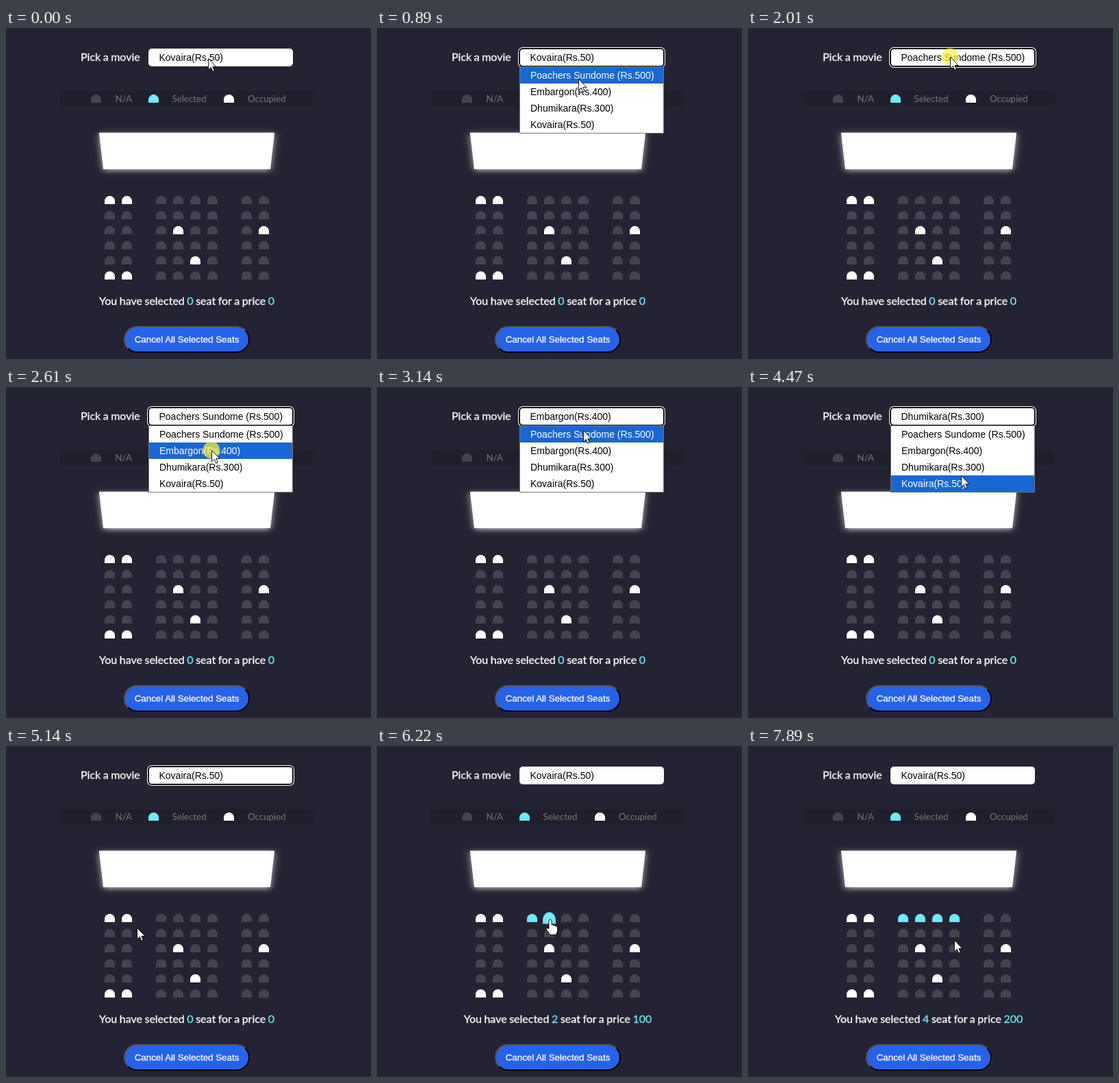
These frames come from a looping animation (533 by 483 pixels, 8 s). An HTML page:

```html
<!DOCTYPE html>
<html lang="en">
<head>
<meta charset="utf-8">
<title>Seat booking</title>
<style>
  html, body { margin: 0; width: 100%; height: 100%; overflow: hidden; background: #242333; }
  .stage { position: absolute; left: 139px; top: 130px; width: 250px; height: 252px; perspective: 1000px; }
  .screen { position: absolute; top: 15.3px; width: 250px; height: 70px; background: #fff;
    transform: rotateX(-45deg); box-shadow: 0 3px 10px rgba(255, 255, 255, .7); }
  .button { position: absolute; left: 172px; top: 435px; width: 184px; height: 39px; box-sizing: border-box;
    border: 2px outset #000; border-radius: 20px; background: #2563eb; }
  svg { position: absolute; left: 0; top: 0; }
  text { font: 16px Lato, sans-serif; word-spacing: -.55px; fill: #fff; white-space: pre; }
  .strong { stroke: #fff; stroke-width: .3px; }
  .ui { font: 14px "Liberation Sans", Arial, sans-serif; word-spacing: 0; fill: #000; }
  .label { font-size: 13.333px; fill: #777; }
  .free { fill: #444451; }
  .chosen { fill: #6feaf6; }
  tspan { fill: #6feaf6; stroke: #6feaf6; }
  .taken { fill: #fff; }
  .cursor { fill: #fff; stroke: #000; stroke-width: .9px; stroke-linejoin: round; }
</style>
</head>
<body>
<div class="stage"><div class="screen"></div></div>
<div class="button"></div>
<svg width="533" height="483">
  <text class="strong" x="109" y="48">Pick a movie</text>
  <rect x="79" y="92" width="370" height="22" rx="5" fill="#000" opacity=".1"/>
  <g id="seats"></g>
  <text class="label" x="159.5" y="108">N/A</text>
  <text class="label" x="242.5" y="108">Selected</text>
  <text class="label" x="353" y="108">Occupied</text>
  <text class="strong" x="264" y="404" text-anchor="middle">You have selected <tspan id="count">0</tspan> seat for a price <tspan id="price">0</tspan></text>
  <text class="ui strong" x="264" y="459" text-anchor="middle" style="font-size:13.333px;fill:#fff">Cancel All Selected Seats</text>
  <g id="ring">
    <rect x="206" y="28" width="215" height="30" rx="7" fill="#fff"/>
    <rect x="207" y="29" width="213" height="28" rx="6" fill="#101010"/>
  </g>
  <rect id="field" fill="#fff"/>
  <text class="ui" id="title" x="223.5" y="48"></text>
  <g id="list">
    <rect x="208.5" y="56.5" width="210" height="97" fill="#fff" stroke="#767676"/>
    <rect id="mark" x="209" width="209" height="24" fill="#1967d2"/>
  </g>
  <circle id="halo" r="12.5" fill="#fff23a" opacity=".7"/>
  <path id="arrow" class="cursor" d="M.5 .5V17L4.3 13.4L6.8 19.3L9.3 18.3L6.8 12.5H12Z"/>
  <path id="hand" class="cursor" d="M-2 1.5Q0-1 2 1.5V8Q4 7 5 9Q7 8 8 10Q10.5 9.5 10.5 12V17L8.5 22.5H0L-5.5 15Q-5.5 11.5-2 13.5Z"/>
</svg>
<script>
const LOOP = 8000, PRESS = 70, REACT = 60;
const $ = id => document.getElementById(id);
const movies = ['Poachers Sundome (Rs.500)', 'Embargon(Rs.400)', 'Dhumikara(Rs.300)', 'Kovaira(Rs.50)'];

// One entry per movie, in list order: the press that opens the list, the press that picks
const choices = [
  { open: 70, x: 295, y: 44, pick: 1450 },
  { open: 2010, x: 295, y: 42, pick: 2610 },
  { open: 3010, x: 300, y: 51, pick: 3540 },
  { open: 3940, x: 315, y: 39, pick: 4670 }];
const bookings = [0, 1, 2, 3].map(i => 5740 + 410 * i);
const presses = [...choices.flatMap(c => [c.open, c.pick]), ...bookings];

// The pointer settles before a press and leaves after it
const rest = (t, x, y) => [[t - 130, x, y], [t + PRESS, x, y]];
const path = [
  ...choices.flatMap((c, i) => [...rest(c.open, c.x, c.y), ...rest(c.pick, 295 + 5 * i, 67 + 25 * i)]),
  ...bookings.flatMap((t, i) => rest(t, 228 + 25 * i, 253)),
  ...rest(630, 294, 77), ...rest(1680, 295, 67),
  [5140, 191, 265], [5270, 198, 280], [7560, 301, 283], [LOOP, 301, 283]
].sort((a, b) => a[0] - b[0]);

function pointer(t) {
  const i = path.findIndex(p => p[0] > t);
  const [t0, x0, y0] = path[i - 1], [t1, x1, y1] = path[i];
  const k = (t - t0) / (t1 - t0);
  return [Math.round(x0 + (x1 - x0) * k), Math.round(y0 + (y1 - y0) * k)];
}

function set(node, attrs) {
  for (const key in attrs) node.setAttribute(key, attrs[key]);
}
function add(parent, tag, attrs) {
  const node = document.createElementNS('http://www.w3.org/2000/svg', tag);
  set(node, attrs);
  return parent.appendChild(node);
}
function addSeat(x, y, kind) {
  const d = `M${x} ${y + 12}v-4.5a7.5 7.5 0 0 1 15 0v4.5z`;
  return { x, y, kind, node: add($('seats'), 'path', { d, class: kind }) };
}

addSeat(124, 97, 'free');
addSeat(208, 97, 'chosen');
addSeat(318, 97, 'taken');
const plan = ['##......', '........', '...#...#', '........', '....#...', '##......'];
const seats = plan.flatMap((line, row) => [...line].map((mark, col) =>
  addSeat(144 + 25 * (col + (col > 1) + (col > 5)), 245 + 22 * row, mark === '#' ? 'taken' : 'free')));

const options = movies.map((name, i) => {
  const node = add($('list'), 'text', { class: 'ui', x: 224, y: 74 + 24 * i });
  node.textContent = name;
  return node;
});

const show = (id, on) => $(id).style.display = on ? '' : 'none';

function drawSelect(t, y) {
  const picked = choices.filter(c => t >= c.pick + REACT).length;
  const current = (picked + 3) % 4;
  const focused = t >= choices[0].open && t < bookings[0];
  const inset = focused ? 1 : 0;
  set($('field'), { x: 208 + inset, y: 30 + inset, width: 211 - 2 * inset, height: 26 - 2 * inset, rx: 5 - inset });
  show('ring', focused);
  $('title').textContent = movies[current];

  show('list', choices.some(c => t >= c.open + REACT && t < c.pick + REACT));
  const active = y >= 57 ? Math.min(3, Math.floor((y - 57) / 24)) : current;
  set($('mark'), { y: 57 + 24 * active });
  options.forEach((node, i) => node.style.fill = i === active ? '#fff' : '#000');
}

// Returns whether the pointer is over a seat that can be booked
function drawSeats(t, x, y) {
  const count = bookings.filter(b => t >= b + REACT).length;
  $('count').textContent = count;
  $('price').textContent = count * 50;
  let hovering = false;
  seats.forEach((s, i) => {
    if (s.kind === 'taken') return;
    const over = x >= s.x && x < s.x + 15 && y >= s.y && y < s.y + 12;
    hovering = hovering || over;
    const cx = s.x + 7.5, cy = s.y + 6;
    set(s.node, {
      class: i >= 2 && i < 2 + count ? 'chosen' : 'free',
      transform: over ? `translate(${cx} ${cy}) scale(1.25 1.4) translate(${-cx} ${-cy})` : ''
    });
  });
  return hovering;
}

function draw(t) {
  const [x, y] = pointer(t);
  drawSelect(t, y);
  const hovering = drawSeats(t, x, y);
  show('halo', presses.some(p => t >= p && t < p + PRESS));
  show('arrow', !hovering);
  show('hand', hovering);
  ['halo', 'arrow', 'hand'].forEach(id => set($(id), { transform: `translate(${x} ${y})` }));
}

function frame(now) {
  draw(now % LOOP);
  requestAnimationFrame(frame);
}
draw(0);
requestAnimationFrame(frame);
</script>
</body>
</html>
```
